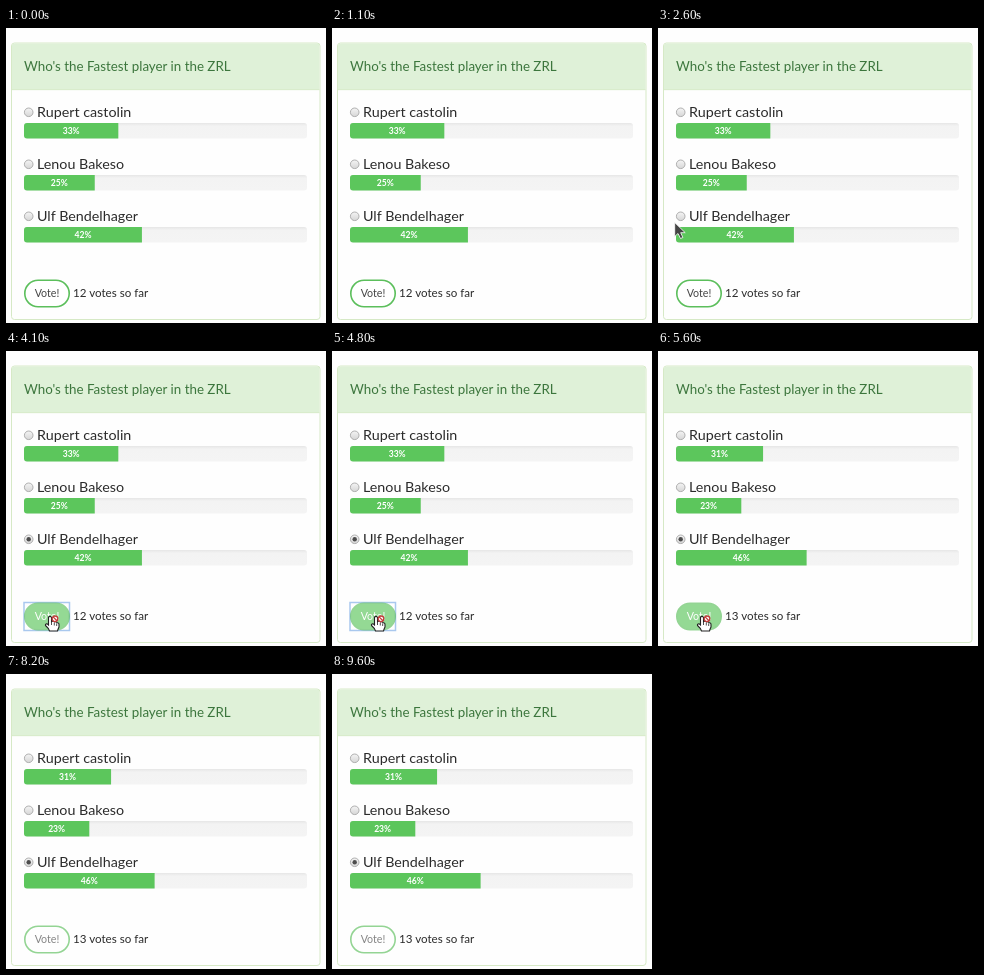
Animation of 320x295 px, one loop 9.9 s. Source, as an HTML page:

```html
<!DOCTYPE html>
<html lang="en">
<head>
<meta charset="utf-8">
<title>Poll</title>
<style>
  html, body { margin: 0; width: 100%; height: 100%; overflow: hidden; background: #fefefe; }
  svg { display: block; width: 320px; height: 295px; font-family: Lato, "Open Sans", sans-serif; }
  .title { font-size: 13.35px; fill: #3c763d; }
  .name { font-size: 14.3px; fill: #2b2b2b; }
  .pct { font-size: 8.6px; font-weight: 700; fill: #fff; text-anchor: middle; }
  .total { font-size: 11.6px; fill: #2b2b2b; }
  .vote { font-size: 10.7px; text-anchor: middle; }
</style>
</head>
<body>
<svg viewBox="0 0 320 295">
  <defs>
    <linearGradient id="knob" x2="0" y2="1">
      <stop stop-color="#f4f4f4"/><stop offset="1" stop-color="#d6d6d6"/>
    </linearGradient>
    <linearGradient id="track" x2="0" y2="1">
      <stop stop-color="#e6e6e6"/><stop offset=".2" stop-color="#f3f3f3"/><stop offset="1" stop-color="#f4f4f4"/>
    </linearGradient>
  </defs>
  <rect x="5.5" y="15" width="308.5" height="276.5" rx="3" fill="#fefefe" stroke="#d6e9c6"/>
  <path d="M6 62V17.500Q6 15.500 8 15.500H311.500Q313.500 15.500 313.500 17.500V62Z" fill="#dff1d8"/>
  <path d="M6 61.700H313.500" stroke="#d6e9c6" stroke-width=".8"/>
  <text class="title" x="18" y="42.800">Who's the Fastest player in the ZRL</text>
  <g id="rows"></g>
  <rect id="ring" x="18" y="251.500" width="45.500" height="28" fill="none" stroke="#a9c8ee" stroke-width="1.5"/>
  <g id="button">
    <rect id="pill" x="18.800" y="252.300" width="44.400" height="26.400" rx="13.200" stroke="#5cbf5c" stroke-width="1.6"/>
    <text id="vote" class="vote" x="41" y="269">Vote!</text>
  </g>
  <text id="total" class="total" x="67" y="269"></text>
  <path id="arrow" d="M0 0V14L3.300 11L5.800 16L8.200 15L6 10.200H10.500Z" fill="#444" stroke="#fff" stroke-width=".8"/>
  <g id="hand">
    <path d="M-1 0Q1 -1.500 2 .5V4.500Q4 3.500 5 5Q7 4 7.500 5.800Q9.500 5.500 9.500 7.500V10Q8.500 12 8 14H0Q-1 11 -4 8.500Q-4.500 6.500 -2 7L-1 8Z" fill="#fff" stroke="#222" stroke-width="1.1"/>
    <path d="M2 5V8M4.800 6V8.500M7.200 6.500V9" stroke="#222" stroke-width=".8"/>
    <g id="deny" stroke="#c33b3b" stroke-width="1.3">
      <circle cx="5.500" cy="1.800" r="2.800" fill="#fff"/>
      <path d="M3.600 -.1L7.400 3.700"/>
    </g>
  </g>
</svg>
<script>
const LOOP = 9900, STEP = 100, LEFT = 18, FULL = 283;
const SELECT = 3000, HOVER = 3700, SUBMIT = 4000, RESULT = 5000, LEAVE = 6200;
const $ = id => document.getElementById(id);
const clamp = v => Math.max(0, Math.min(1, v));
const show = (el, on) => el.setAttribute('visibility', on ? 'visible' : 'hidden');

const options = [
  { name: 'Rupert castolin', before: 4, after: 4 },
  { name: 'Lenou Bakeso', before: 3, after: 3 },
  { name: 'Ulf Bendelhager', before: 5, after: 6 }
];

// Cursor stops: time, x, y
const path = [
  [1600, 300, 110], [1900, 75.5, 172], [2100, 70, 174], [2600, 16.7, 194.500],
  [2800, 20, 187], [3200, 20, 187], [3700, 43.5, 266], [6100, 43.5, 266], [6500, 250, 278]
];

const rowY = i => 95 + i * 52;
$('rows').innerHTML = options.map((o, i) => {
  const y = rowY(i);
  return `<circle cx="22.7" cy="${y - 10.7}" r="4.3" fill="url(#knob)" stroke="#a8a8a8" stroke-width=".9"/>
    <circle class="dot" cx="22.7" cy="${y - 10.7}" r="2.2" fill="#4c4c4c"/>
    <text class="name" x="31" y="${y - 6}">${o.name}</text>
    <rect x="${LEFT}" y="${y}" width="${FULL}" height="15.5" rx="3" fill="url(#track)"/>
    <path class="bar" fill="#5cc65c"/>
    <text class="pct" y="${y + 10.8}"></text>`;
}).join('');
const all = c => [...document.querySelectorAll(c)];
const dots = all('.dot'), bars = all('.bar'), labels = all('.pct');

function cursorAt(t) {
  const i = path.findIndex(p => p[0] > t);
  if (i < 1) return null;
  const [t0, x0, y0] = path[i - 1], [t1, x1, y1] = path[i];
  const p = (t - t0) / (t1 - t0), k = p * p * (3 - 2 * p);
  return [x0 + (x1 - x0) * k, y0 + (y1 - y0) * k];
}

function drawBars(t) {
  const done = t >= RESULT;
  const ease = 1 - (1 - clamp((t - RESULT) / 600)) ** 3;
  options.forEach((o, i) => {
    const from = o.before / 12, to = o.after / 13;
    const w = FULL * (from + (to - from) * ease), y = rowY(i);
    bars[i].setAttribute('d', `M${LEFT + w} ${y}v15.5H${LEFT + 3}q-3 0-3-3v-9.5q0-3 3-3Z`);
    labels[i].setAttribute('x', LEFT + w / 2);
    labels[i].textContent = Math.round((done ? to : from) * 100) + '%';
    show(dots[i], i === 2 && t >= SELECT);
  });
  $('total').textContent = (done ? 13 : 12) + ' votes so far';
}

function drawButton(t) {
  const hover = t >= HOVER && t < LEAVE, sent = t >= SUBMIT;
  $('button').setAttribute('opacity', sent ? .65 : 1);
  $('pill').setAttribute('fill', hover ? '#5cc65c' : '#fff');
  $('vote').setAttribute('fill', hover ? '#fff' : '#444');
  show($('ring'), sent && t < RESULT);
}

function drawCursor(t) {
  const pos = cursorAt(t), over = t >= HOVER && t < LEAVE;
  show($('arrow'), pos && !over);
  show($('hand'), pos && over);
  show($('deny'), pos && over && t >= SUBMIT);
  if (pos) for (const id of ['arrow', 'hand']) $(id).setAttribute('transform', `translate(${pos})`);
}

function frame() {
  const t = Math.floor(performance.now() % LOOP / STEP) * STEP;
  drawBars(t);
  drawButton(t);
  drawCursor(t);
  requestAnimationFrame(frame);
}
frame();
</script>
</body>
</html>
```
